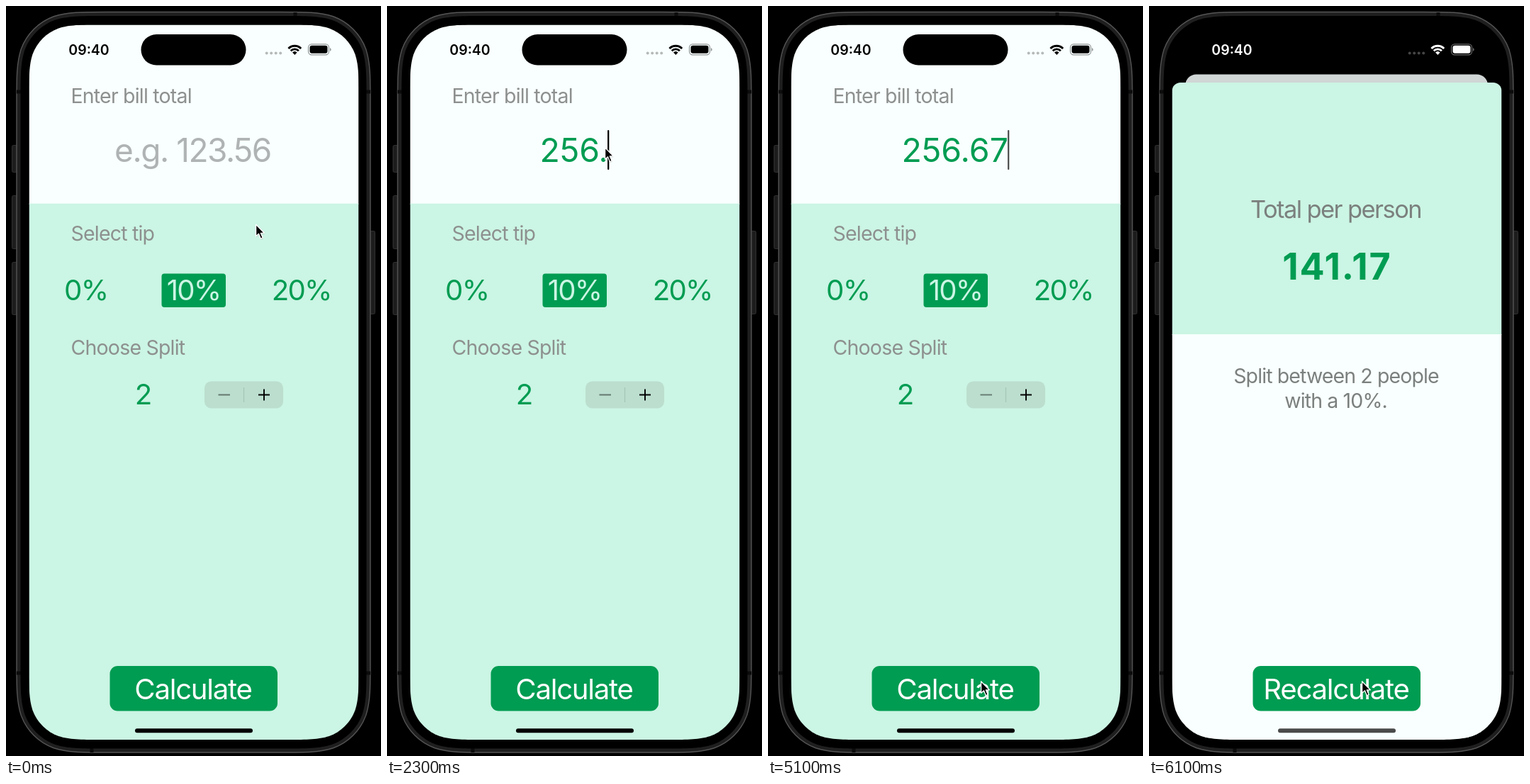
These frames come from a looping animation (529 by 1058 pixels, 8 s). An HTML page:

```html
<!DOCTYPE html>
<html lang="en">
<head>
<meta charset="utf-8">
<title>Tip calculator</title>
<style>
  html, body { margin: 0; width: 100%; height: 100%; overflow: hidden; background: #000; }
  svg { display: block; width: 100%; height: 100%; }
  text { font-family: Inter, Roboto, sans-serif; font-optical-sizing: none; fill: #009c52; white-space: pre; }
  .mid { text-anchor: middle; }
  .label { font-size: 28.5px; letter-spacing: -.028em; fill: #8d908f; }
  .field { font-size: 46.5px; }
  .hint { font-size: 46px; letter-spacing: -.032em; fill: #afb3b3; }
  .tip { font-size: 40.2px; letter-spacing: -.045em; }
  .button { font-size: 40.2px; letter-spacing: -.032em; fill: #fff; }
  .note { letter-spacing: -.031em; fill: #7b807e; }
  .title { font-size: 34.4px; letter-spacing: -.045em; }
  .total { font-size: 52px; font-weight: 700; letter-spacing: .035em; }
  .clock { font-size: 19.5px; font-weight: 600; fill: currentColor; }
  .white { fill: #f8fffe; }
  .mint { fill: #cbf5e4; }
  .green { fill: #009c52; }
</style>
</head>
<body>
<svg viewBox="0 0 529 1058" preserveAspectRatio="none">
  <defs>
    <clipPath id="screen"><path id="glass"/></clipPath>
    <clipPath id="cardShape"><rect x="32.5" y="26.5" width="465" height="1020" rx="17"/></clipPath>
    <clipPath id="sheetShape"><rect x="32.5" width="465" height="1000" rx="12"/></clipPath>
  </defs>

  <!-- phone body -->
  <g fill="#1d1d1d" stroke="#303030">
    <rect x="8.5" y="196.5" width="8" height="38" rx="2"/>
    <rect x="8.5" y="267.5" width="8" height="75" rx="2"/>
    <rect x="8.5" y="361.5" width="8" height="74" rx="2"/>
    <rect x="512.5" y="317.5" width="8" height="117" rx="2"/>
  </g>
  <path id="body" fill="#1f1f1f" stroke="#555" stroke-width="1.4"/>
  <path d="M15 121h6M508 121h6M15 941h6M508 941h6M408 9v6M121 1047v6" stroke="#0c0c0c" stroke-width="5"/>
  <path id="bezel"/>

  <g clip-path="url(#screen)">
    <rect x="32" y="26" width="466" height="1010"/>

    <g id="card">
      <g clip-path="url(#cardShape)">
        <rect class="white" x="32" y="26" width="466" height="254"/>
        <rect class="mint" x="32" y="278.7" width="466" height="769"/>
        <text class="label" x="91.5" y="137">Enter bill total</text>
        <text class="field hint mid" id="hint" x="263.5" y="220">e.g. 123.56</text>
        <text class="field mid" id="amount" x="263.7" y="219.7"></text>
        <rect id="caret" y="175" width="2.2" height="56" rx="1"/>

        <text class="label" x="91.5" y="331">Select tip</text>
        <rect class="green" x="219.5" y="377.5" width="90.5" height="47.5" rx="4"/>
        <text class="tip mid" x="112.7" y="414.8">0%</text>
        <text class="tip mid mint" x="264.5" y="414.8">10%</text>
        <text class="tip mid" x="416.7" y="414.8">20%</text>

        <text class="label" x="91.5" y="492">Choose Split</text>
        <text class="tip mid" x="193" y="561.8">2</text>
        <rect x="280" y="529.5" width="111" height="38" rx="9.5" fill="#bbdecf"/>
        <path d="M335.5 538v21" stroke="#a4c6b8" stroke-width="1.2"/>
        <path d="M299.5 548.5h16.5" stroke="#64796f" stroke-width="1.9"/>
        <path d="M356 548.5h16M364 540.5v16" stroke="#000" stroke-width="1.9"/>

        <rect class="green" x="146.5" y="931" width="236.5" height="63.5" rx="11"/>
        <text class="button mid" x="264" y="978">Calculate</text>
        <rect id="dim" x="32" y="26" width="466" height="1021"/>
      </g>
    </g>

    <g id="sheet">
      <g clip-path="url(#sheetShape)">
        <rect class="mint" x="32" width="466" height="356"/>
        <rect class="white" x="32" y="355" width="466" height="645"/>
        <text class="note title mid" x="263.5" y="191">Total per person</text>
        <text class="total mid" x="265.4" y="277.5">141.17</text>
        <text class="label note mid" x="264" y="424">Split between 2 people</text>
        <text class="label note mid" x="263.6" y="459">with a 10%.</text>
        <rect class="green" x="146.5" y="823" width="236.5" height="63.5" rx="11"/>
        <text class="button mid" x="264" y="870">Recalculate</text>
      </g>
    </g>

    <rect x="190.5" y="40" width="148" height="43.5" rx="21.7"/>
    <g id="status" fill="currentColor">
      <text class="clock mid" x="117" y="68.5">09:40</text>
      <g opacity=".27">
        <circle cx="367.7" cy="66.6" r="2"/><circle cx="374.2" cy="66.6" r="2"/>
        <circle cx="380.7" cy="66.6" r="2"/><circle cx="387.2" cy="66.6" r="2"/>
      </g>
      <g fill="none" stroke="currentColor" stroke-width="2.8">
        <path d="M398.4 60A12.4 12.4 0 0 1 416.2 60"/>
        <path d="M401.7 63.3A7.9 7.9 0 0 1 412.9 63.3"/>
      </g>
      <path d="M407.3 69L404 65.5A4.8 4.8 0 0 1 410.6 65.5Z"/>
      <rect x="426.5" y="53.8" width="29" height="15" rx="4.6" fill="none" stroke="currentColor" stroke-width="1.2" opacity=".42"/>
      <rect x="428.5" y="55.8" width="25" height="11" rx="3"/>
      <path d="M457 59v4.8q1.6-.7 1.6-2.4t-1.6-2.4" opacity=".45"/>
    </g>
    <rect id="home" x="182" y="1019.3" width="166" height="5.9" rx="2.95"/>
  </g>

  <g id="pointer">
    <path d="M1 3V18.500L4.800 15.200L7.500 22L10.800 20.700L8 14.200H13Z" opacity=".18"/>
    <path d="M.6 .8V17.300L4.500 13.800L7.300 20.700L10.200 19.500L7.300 12.800H12.300Z" stroke="#fff" stroke-width="1.3" stroke-linejoin="round"/>
  </g>
</svg>

<script>
const LOOP = 8000, STEP = 100;
const KEYS = [1300, 1500, 1800, 2100, 2400, 2600];
const FOCUS = 1000, BLINK = 3040, PRESENT = 5250, SETTLED = 6100;
const $ = id => document.getElementById(id);
const [card, hint, amount, caret, dim, sheet, status_, home, pointer] =
  ['card', 'hint', 'amount', 'caret', 'dim', 'sheet', 'status', 'home', 'pointer'].map($);

const ramp = (t, a, b) => Math.min(1, Math.max(0, (t - a) / (b - a)));
const ease = u => u * u * (3 - 2 * u);
const mix = (a, b, u) => a + (b - a) * u;
const grey = v => `rgb(${v},${v},${v})`;

// rounded rectangle with continuous-curvature corners
function squircle(x, y, w, h, r) {
  const half = [[1.529, 0], [1.088, 0], [.868, 0], [.631, .075], [.373, .169]];
  const corner = [...half, ...half.map(([a, b]) => [b, a]).reverse()];
  const place = (right, low) => {
    const pts = corner.map(([a, b]) =>
      [right ? x + w - a * r : x + a * r, low ? y + h - b * r : y + b * r]);
    return right === low ? pts.reverse() : pts;
  };
  const bits = [[0, 0], [1, 0], [1, 1], [0, 1]].map(([right, low]) => {
    const [first, ...rest] = place(right, low);
    return `${first}C${rest.join(' ')}`;
  });
  return `M${bits.join('L')}Z`;
}

function caretAlpha(t) {
  if (t < FOCUS || t >= PRESENT) return 0;
  if (t < BLINK) return 1;
  const p = (t - BLINK) % 1000;
  return p < 500 ? 1 - ramp(p, 0, 200) : ramp(p, 500, 700);
}

// critically damped spring
function presented(t) {
  if (t < PRESENT) return 0;
  if (t >= SETTLED) return 1;
  const x = (t - PRESENT) * 0.0111;
  return 1 - (1 + x) * Math.exp(-x);
}

function pointerAt(t) {
  const a = ease(ramp(t, 0, 900)), b = ease(ramp(t, 3550, 4715));
  return [
    mix(352, 307, a) - 7 * b - 7 * Math.sin(Math.PI * b),
    mix(307.5, 199, a) + 753 * b
  ];
}

function draw(t) {
  const typed = '256.67'.slice(0, KEYS.filter(k => t >= k).length);
  if (amount.textContent !== typed) amount.textContent = typed;
  hint.setAttribute('visibility', typed ? 'hidden' : 'visible');
  const edge = typed ? 263.7 + amount.getComputedTextLength() / 2 : 151;
  caret.setAttribute('x', edge - 0.9);
  caret.setAttribute('opacity', caretAlpha(t));

  const p = presented(t), scale = 1 - 0.082 * p;
  card.setAttribute('transform',
    `translate(${mix(265, 264.6, p)} ${mix(26.5, 96.5, p)}) scale(${scale}) translate(-265 -26.5)`);
  dim.setAttribute('opacity', 0.16 * p);
  sheet.setAttribute('transform', `translate(0 ${mix(1036, 108, p)})`);
  sheet.setAttribute('visibility', p ? 'visible' : 'hidden');

  status_.style.color = grey(Math.round(255 * ramp(t, 5420, 5770)));
  home.setAttribute('fill', grey(Math.round(74 * p)));
  pointer.setAttribute('transform', `translate(${pointerAt(t)})`);
}

$('body').setAttribute('d', squircle(15, 8.5, 499, 1044.5, 83));
$('bezel').setAttribute('d', squircle(20.5, 14, 488, 1033.5, 77));
$('glass').setAttribute('d', squircle(32.5, 26.5, 465, 1008.5, 66));

let start;
function tick(now) {
  start ??= now;
  draw(Math.floor((now - start) % LOOP / STEP) * STEP);
  requestAnimationFrame(tick);
}
draw(0);
requestAnimationFrame(tick);
</script>
</body>
</html>
```
